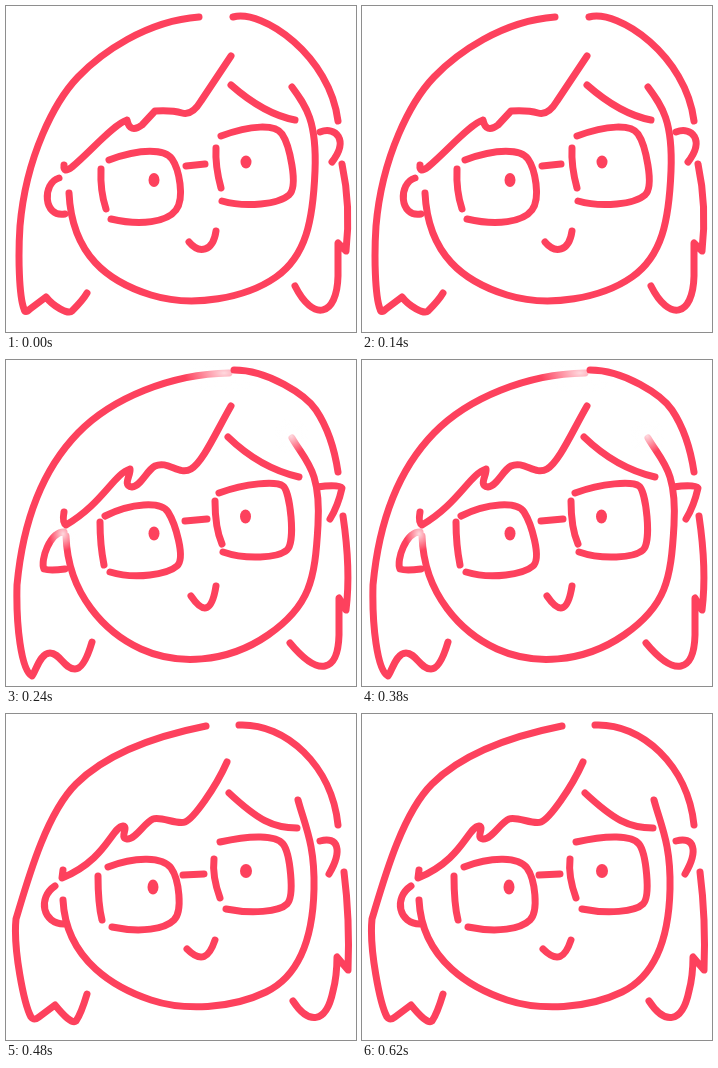
Write an HTML page that moves like this. It is 350 px wide and 326 px high and loops after 0.72 s.

```html
<!DOCTYPE html>
<html lang="en">
<head>
<meta charset="utf-8">
<title>Wobbling line portrait</title>
<style>
  html, body { margin: 0; width: 100%; height: 100%; overflow: hidden; background: #fff; }
  svg { display: block; width: 350px; height: 326px; }
  .pose {
    fill: none; stroke: #fd415d; stroke-width: 7;
    stroke-linecap: round; stroke-linejoin: round;
    opacity: 0; animation: show 720ms step-end infinite;
  }
  .second { animation-delay: -480ms; }
  .third { animation-delay: -240ms; }
  .eye { fill: #fd415d; stroke: none; }
  .fade { fill: url(#fade); stroke: none; }
  @keyframes show {
    0% { opacity: 1; }
    33.3333%, 100% { opacity: 0; }
  }
</style>
</head>
<body>
<svg viewBox="0 0 350 326">
  <defs>
    <radialGradient id="fade">
      <stop offset="0" stop-color="#fff" stop-opacity=".8"/>
      <stop offset="1" stop-color="#fff" stop-opacity="0"/>
    </radialGradient>
  </defs>

  <g class="pose">
    <!-- hair -->
    <path d="M193 11C140 15 95 47 72 71S20 150 14 220C12 250 13 290 18 303Q19 308 24 303L40 291C47 300 62 309 66 305S77 294 81 287"/>
    <path d="M227 11C257 3 324 50 332 115"/>
    <path d="M336 158Q345 200 340 245L332 237V270C331 311 307 316 289 280"/>
    <path d="M225 50L195 95Q186 110 176 107T149 105L136 119Q124 128 121 114C108 118 85 145 66 161Q57 168 58 159"/>
    <path d="M225 79Q258 108 289 114"/>
    <!-- face and ears -->
    <path d="M63 187C66 250 103 276 145 289S240 292 270 271S307 215 309 165S300 100 286 81"/>
    <path d="M53 172C36 177 37 212 59 208"/>
    <path d="M314 126C330 120 343 134 326 156"/>
    <path d="M183 236C193 248 207 246 210 225"/>
    <!-- glasses -->
    <path d="M95 163Q94 185 100 203M103 154C135 142 159 143 166 153S179 192 170 204S135 220 105 213"/>
    <path d="M180 160L199 158"/>
    <path d="M210 142Q209 160 215 182M215 130C245 119 269 118 276 128S293 180 283 189S240 202 216 195"/>
    <ellipse class="eye" cx="148" cy="174" rx="5.5" ry="7"/>
    <ellipse class="eye" cx="240" cy="156" rx="5.5" ry="6.5"/>
  </g>

  <g class="pose second">
    <!-- strokes with washed-out ends -->
    <path d="M223 13C165 14 106 38 72 73S17 160 11 225C10 265 15 310 26 316C30 311 34 293 44 293S58 309 69 309Q78 309 86 282"/>
    <path d="M60 176C62 235 100 273 135 289S220 304 262 275S309 220 312 165S300 102 286 78"/>
    <path d="M58 172C44 172 34 200 38 209Q44 211 59 209"/>
    <ellipse class="fade" cx="218" cy="13" rx="40" ry="20"/>
    <ellipse class="fade" cx="285" cy="76" rx="18" ry="18"/>
    <ellipse class="fade" cx="57" cy="174" rx="14" ry="17"/>
    <!-- hair -->
    <path d="M228 10C262 10 300 35 310 50S328 85 332 112"/>
    <path d="M337 156Q345 210 340 250L333 238V275C332 312 313 318 284 283"/>
    <path d="M225 46C210 72 197 102 185 109C173 116 162 100 149 106C141 110 135 126 126 127C116 126 125 115 124 109C108 114 96 144 60 165Q56 163 58 152"/>
    <path d="M222 77Q254 108 293 117"/>
    <!-- ear and mouth -->
    <path d="M311 127Q333 124 336 128Q332 146 324 159"/>
    <path d="M185 236C198 255 206 251 210 226"/>
    <!-- glasses -->
    <path d="M94 162Q94 185 98 205M99 156C125 143 155 141 162 152S180 198 171 206S130 220 104 212"/>
    <path d="M179 161L201 159"/>
    <path d="M209 141Q209 168 216 184M213 133C240 123 270 121 277 126S290 182 281 190S240 200 217 192"/>
    <ellipse class="eye" cx="148" cy="173.5" rx="5.5" ry="7"/>
    <ellipse class="eye" cx="239.5" cy="156.5" rx="5.5" ry="7"/>
  </g>

  <g class="pose third">
    <!-- hair -->
    <path d="M200 12C150 22 100 40 70 70S22 165 10 205C7 235 18 290 25 303Q28 307 33 303L49 291C58 302 66 310 70 307Q75 300 81 280"/>
    <path d="M233 11C280 9 326 52 332 111"/>
    <path d="M338 158Q344 205 342 256L331 243Q331 262 327 277C320 311 302 310 287 287"/>
    <path d="M221 48C209 75 187 105 179 108S155 102 147 105S129 126 121 125S123 113 117 112C106 113 100 146 56 164L57 156"/>
    <path d="M223 79C252 106 267 114 291 114"/>
    <!-- face and ears -->
    <path d="M57 186C60 248 112 275 145 286S225 295 260 278S307 220 308 175S299 112 292 86"/>
    <path d="M49 172C31 184 37 210 58 210"/>
    <path d="M314 127C332 122 337 136 323 160"/>
    <path d="M181 235C195 249 203 244 209 226"/>
    <!-- glasses -->
    <path d="M92 162Q92 190 96 206M102 153C130 142 157 143 165 154S177 197 168 206S135 219 106 213"/>
    <path d="M177 161L198 160"/>
    <path d="M208 145Q206 162 214 184M214 128C245 121 270 121 277 130S289 182 281 190S245 200 220 195"/>
    <ellipse class="eye" cx="147" cy="173" rx="5.5" ry="7.5"/>
    <ellipse class="eye" cx="240" cy="157" rx="6" ry="7"/>
  </g>
</svg>
</body>
</html>
```
